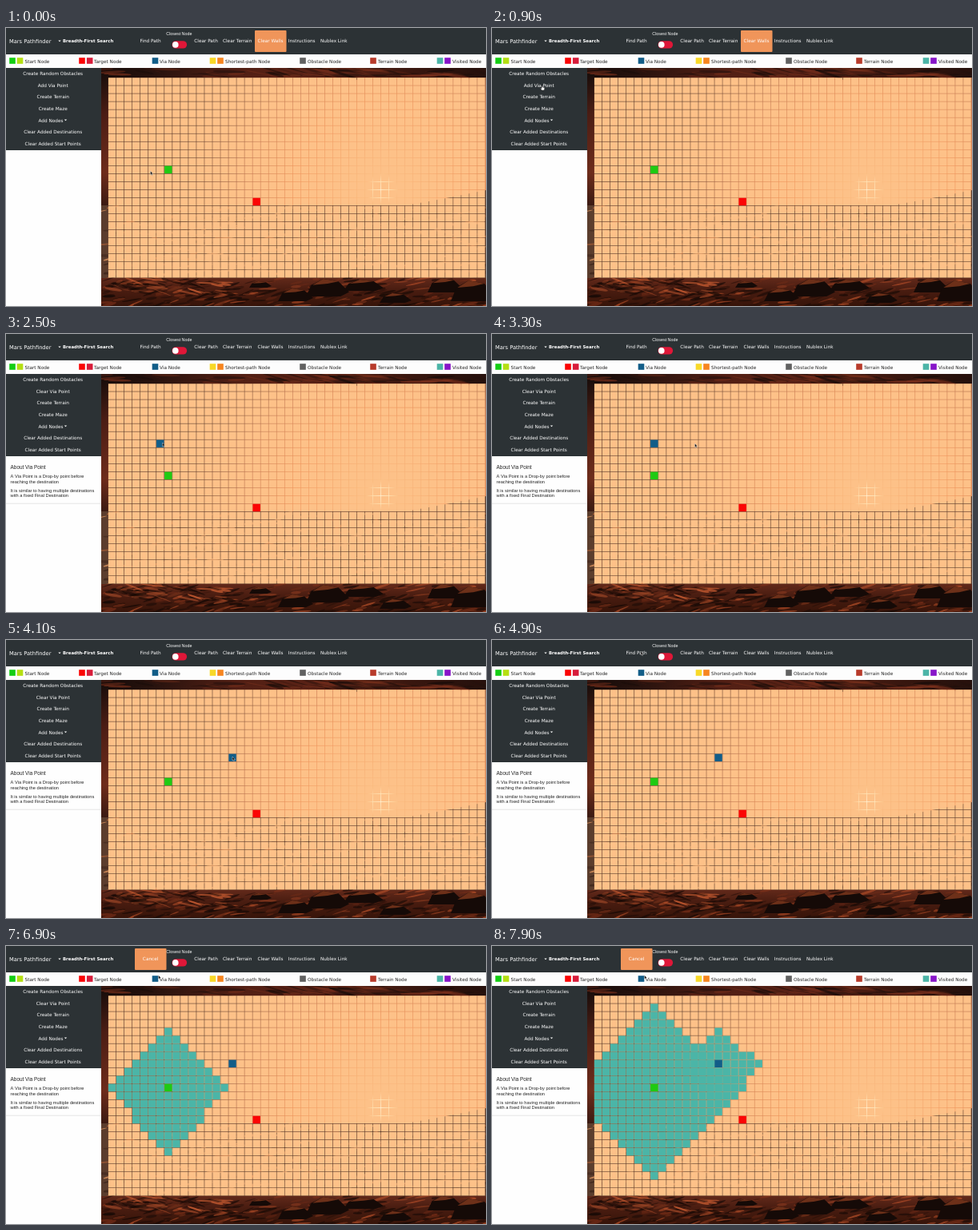
An HTML page with a canvas that plays this animation: 600x348 px, repeating every 8000 ms.

```html
<!DOCTYPE html>
<html lang="en">
<head>
<meta charset="utf-8">
<title>Mars Pathfinder</title>
<style>
html, body { margin: 0; width: 100%; height: 100%; overflow: hidden; background: #fff; }
canvas { display: block; width: 600px; height: 348px; }
</style>
</head>
<body>
<canvas id="stage"></canvas>
<script>
const W = 600, H = 348, LOOP = 8000;
const SANS = '"DejaVu Sans", sans-serif', ARIAL = '"Liberation Sans", sans-serif';
const GRID = { x: 127.6, y: 62, cols: 47, rows: 25, step: 10.03, gap: 0.6 };
const COLOR = {
  bar: '#2c3235', hot: '#f0955a', sand: '#fdc188', teal: '#4bb5a7',
  green: '#1fca12', red: '#fb0505', blue: '#125d88'
};
const START = [7, 11], TARGET = [18, 15], VIA = [15, 8];
const CLICK_VIA = 1000, SEARCH_AT = 6156, CELLS_PER_MS = 0.164;

const scale = window.devicePixelRatio || 1;

function layer(canvas) {
  canvas.width = W * scale;
  canvas.height = H * scale;
  const c = canvas.getContext('2d');
  c.scale(scale, scale);
  return c;
}

const ctx = layer(document.getElementById('stage'));
const backdrop = document.createElement('canvas');
const pageArt = document.createElement('canvas');

function rect(c, x, y, w, h, fill) {
  c.fillStyle = fill;
  c.fillRect(x, y, w, h);
}

function round(c, x, y, w, h, r, fill) {
  c.beginPath();
  c.roundRect(x, y, w, h, r);
  c.fillStyle = fill;
  c.fill();
}

function text(c, str, x, y, size, fill, opt = {}) {
  c.font = `${opt.bold ? 'bold ' : ''}${size}px ${opt.font || SANS}`;
  c.textAlign = opt.align || 'left';
  c.fillStyle = fill;
  c.fillText(str, x, y);
}

function poly(c, points, fill) {
  c.beginPath();
  points.forEach(([x, y]) => c.lineTo(x, y));
  c.closePath();
  c.fillStyle = fill;
  c.fill();
}

function gradient(g, stops) {
  stops.forEach(([at, color]) => g.addColorStop(at, color));
  return g;
}

function randomFrom(seed) {
  return () => (seed = (seed * 16807) % 2147483647) / 2147483647;
}

function caret(c, x, y) {
  poly(c, [[x, y], [x + 3.4, y], [x + 1.7, y + 1.8]], '#fff');
}

// Scatters thin slanted ellipses over a box.
function streaks(c, rnd, n, [x, y, w, h], len, tilt, colors) {
  for (let i = 0; i < n; i++) {
    c.globalAlpha = 0.25 + rnd() * 0.5;
    c.beginPath();
    c.ellipse(x + rnd() * w, y + rnd() * h, len * (0.3 + rnd() * 0.7), 0.6 + rnd() * 1.3,
      tilt + (rnd() - 0.5) * 0.4, 0, 7);
    c.fillStyle = colors[Math.floor(rnd() * colors.length)];
    c.fill();
  }
  c.globalAlpha = 1;
}

// Soft desert scene: it shows around the board and through the gaps between cells.
function paintBackdrop(c) {
  const rnd = randomFrom(77);
  c.save();
  c.beginPath();
  c.rect(119, 50, 481, 298);
  c.clip();
  rect(c, 119, 50, 481, 298, '#54382b');
  rect(c, 119, 62, 481, 160, gradient(c.createRadialGradient(470, 202, 0, 470, 202, 290),
    [[0, '#fffbe2'], [0.035, '#ffe9bd'], [0.07, '#fabb80'], [0.38, '#ee945c'],
     [0.58, '#c47a53'], [0.8, 'rgba(112,74,54,.8)'], [1, 'rgba(84,56,43,0)']]));
  rect(c, 119, 50, 481, 12, gradient(c.createLinearGradient(119, 0, 600, 0),
    [[0, '#140b09'], [0.15, '#2a130e'], [0.35, '#521f14'], [0.6, '#5b2316'], [0.8, '#3a170f'], [1, '#23100c']]));
  streaks(c, rnd, 60, [119, 50, 481, 11], 26, 0.12, ['#160b08', '#7a301c', '#2a120d']);
  rect(c, 119, 58, 9, 164, gradient(c.createLinearGradient(0, 58, 0, 222),
    [[0, '#1a0e0b'], [0.3, '#4a1d14'], [0.75, '#6e2c1b'], [1, '#3a1a12']]));

  poly(c, [[119, 222], [500, 222], [545, 214], [600, 203], [600, 348], [119, 348]], '#5b3d2d');
  streaks(c, rnd, 420, [119, 224, 481, 88], 10, -0.1, ['#2a1710', '#e59a62', '#c06a3a']);
  rect(c, 119, 313, 481, 35, gradient(c.createLinearGradient(0, 313, 0, 348),
    [[0, '#62291a'], [0.4, '#4a1d11'], [1, '#371409']]));
  streaks(c, rnd, 230, [119, 313, 481, 35], 13, -0.2, ['#120805', '#1d0c07', '#b24d28', '#7c3019']);
  streaks(c, rnd, 45, [119, 313, 160, 20], 15, 0.2, ['#c85c32', '#160905']);
  const rocks = [[362, 334, 22, 8], [402, 325, 27, 11], [447, 322, 25, 7],
                 [487, 338, 20, 6], [549, 322, 22, 9], [584, 329, 28, 13], [318, 321, 14, 4]];
  rocks.forEach(([x, y, rx, ry]) => {
    poly(c, [[x - rx, y + ry], [x - rx * 0.75, y - ry * 0.3], [x - rx * 0.2, y - ry],
             [x + rx * 0.5, y - ry * 0.7], [x + rx, y + ry * 0.5], [x + rx * 0.6, y + ry]], '#150a07');
    poly(c, [[x - rx * 0.7, y - ry * 0.3], [x - rx * 0.2, y - ry], [x + rx * 0.5, y - ry * 0.7],
             [x, y - ry * 0.45]], '#6d3019');
  });
  c.restore();
}

function paintLegend(c) {
  rect(c, 0, 33, W, 17, '#fdfdfd');
  const items = [
    ['Start Node', 23.5, [4.2, '#13ce13'], [13.7, '#b5df12']],
    ['Target Node', 110, [91.2, '#fb0505'], [100.9, '#d81c3a']],
    ['Via Node', 192, [182.7, COLOR.blue]],
    ['Shortest-path Node', 274, [254.7, '#f8d927'], [264.2, '#f7851f']],
    ['Obstacle Node', 377, [367.2, '#606060']],
    ['Terrain Node', 465, [455.2, '#b83a2a']],
    ['Visited Node', 558, [538.7, COLOR.teal], [548.2, '#8715c9']]
  ];
  items.forEach(([label, x, ...swatches]) => {
    swatches.forEach(([sx, color]) => rect(c, sx, 37.2, 7.6, 7.6, color));
    text(c, label, x, 43.5, 5.75, '#252525');
  });
}

function paintPage(c) {
  rect(c, 0, 0, W, 33, COLOR.bar);
  text(c, 'Mars Pathfinder', 4, 18.8, 6.7, '#fff');
  caret(c, 65.3, 15.4);
  text(c, 'Breadth-First Search', 71, 18.4, 5.4, '#fff', { bold: true });
  text(c, 'Closest Node', 200.3, 9, 5.35, '#fff', { font: ARIAL });
  round(c, 207.5, 16.2, 18.6, 9.4, 4.7, '#df1738');
  c.beginPath();
  c.arc(211.8, 20.9, 3.8, 0, 7);
  c.fillStyle = '#fff';
  c.fill();
  paintLegend(c);
  rect(c, 0, 50, 119, 298, '#fefefe');
  rect(c, 0, 50, 119, 103, COLOR.bar);
  caret(c, 72.8, 114.4);
}

// Breadth-first order: down, right, up, left; stops on reaching the goal.
function search(from, goal, limit) {
  const seen = new Set([from.join()]), queue = [from], order = [];
  while (queue.length && order.length < limit) {
    const [x, y] = queue.shift();
    order.push([x, y]);
    if (x === goal[0] && y === goal[1]) break;
    for (const [dx, dy] of [[0, 1], [1, 0], [0, -1], [-1, 0]]) {
      const nx = x + dx, ny = y + dy, key = nx + ',' + ny;
      if (nx < 0 || ny < 0 || nx >= GRID.cols || ny >= GRID.rows || seen.has(key)) continue;
      seen.add(key);
      queue.push([nx, ny]);
    }
  }
  return order;
}

const visited = [...search(START, VIA, 999), ...search(VIA, TARGET, 120)];

function cell([col, row], color) {
  const { x, y, step, gap } = GRID;
  rect(ctx, x + col * step + gap / 2, y + row * step + gap / 2, step - gap, step - gap, color);
}

function viaAt(t) {
  if (t < 2600) return [6, 7];
  if (t < 3400) return [7, 7];
  const p = Math.min(1, (t - 3400) / 600);
  return [7 + Math.round(p * 8), p > 0.8 ? 8 : 7];
}

function drawBoard(t) {
  for (let row = 0; row < GRID.rows; row++)
    for (let col = 0; col < GRID.cols; col++) cell([col, row], COLOR.sand);
  const count = Math.max(0, Math.round((t - SEARCH_AT) * CELLS_PER_MS));
  visited.slice(0, count).forEach(pos => cell(pos, COLOR.teal));
  cell(START, COLOR.green);
  cell(TARGET, COLOR.red);
  if (t >= CLICK_VIA) cell(viaAt(t), COLOR.blue);
}

function drawNav(t) {
  if (t < CLICK_VIA) round(ctx, 311, 3, 39.5, 27, 1, COLOR.hot);
  const glow = Math.max(0, Math.min(1, (t - 4950) / 150));
  ctx.globalAlpha = glow;
  round(ctx, 161, 3, 39.5, 27, 1, COLOR.hot);
  ctx.globalAlpha = 1;
  const label = t < SEARCH_AT ? 'Find Path' : 'Cancel';
  text(ctx, label, 180.6, 18.4, 5.75, '#fff', { align: 'center' });
  [['Clear Path', 235.3], ['Clear Terrain', 271], ['Clear Walls', 314.6],
   ['Instructions', 352.8], ['Nublex Link', 393]]
    .forEach(([str, x]) => text(ctx, str, x, 18.4, 5.75, '#fff'));
}

function drawSidebar(t) {
  const added = t >= CLICK_VIA;
  if (added && t < 2500) {
    rect(ctx, 0, 64.3, 119, 15.2, '#191b1c');
    ctx.strokeStyle = '#d98a55';
    ctx.lineWidth = 0.8;
    ctx.strokeRect(0.4, 64.7, 118.2, 14.6);
  }
  ['Create Random Obstacles', added ? 'Clear Via Point' : 'Add Via Point', 'Create Terrain',
   'Create Maze', 'Add Nodes', 'Clear Added Destinations', 'Clear Added Start Points']
    .forEach((str, i) => text(ctx, str, i === 4 ? 56 : 58.7, 59 + i * 14.65, 5.75, '#fff', { align: 'center' }));
  if (!added) return;
  const say = (str, y, size) => text(ctx, str, 5.6, y, size, '#222', { font: ARIAL });
  say('About Via Point', 168.8, 6.4);
  say('A Via Point is a Drop-by point before', 180.3, 5.7);
  say('reaching the destination', 187.1, 5.7);
  say('It is similar to having multiple destinations', 197.6, 5.7);
  say('with a fixed Final Destination', 204.4, 5.7);
  rect(ctx, 0, 211.8, 119, 0.7, '#dcdcdc');
}

// Pointer stops: time, x, y.
const route = [[0, 180.5, 179], [400, 180.5, 179], [900, 62, 72], [1150, 62, 72], [1800, 191, 56],
  [2400, 193, 136], [2600, 198, 136], [2900, 206, 137], [3300, 253.5, 137], [3700, 283, 146],
  [4200, 283, 146], [4900, 186, 14], [6200, 185, 14], [6500, 190.5, 36.5], [8000, 190.5, 36.5]];

function pointerAt(t) {
  const i = Math.max(1, route.findIndex(stop => stop[0] > t));
  const [t0, x0, y0] = route[i - 1], [t1, x1, y1] = route[i];
  const p = (t - t0) / (t1 - t0), e = p * p * (3 - 2 * p);
  return [x0 + (x1 - x0) * e, y0 + (y1 - y0) * e];
}

function drawPointer(t) {
  const [x, y] = pointerAt(t);
  const hand = (t > 4950 && t < 6300) || (t > 880 && t < 1200);
  const shape = hand
    ? [[0, 0], [1, 0], [1.2, 2], [3.8, 2.6], [3.6, 5], [2.8, 6], [0.2, 6], [-1.5, 3.5], [-0.9, 3], [0, 3.8]]
    : [[0, 0], [0, 4.8], [1, 3.9], [1.8, 5.6], [2.6, 5.2], [1.8, 3.6], [3.3, 3.5]];
  poly(ctx, shape.map(([px, py]) => [x + px, y + py]), hand ? '#fff' : '#111');
  ctx.strokeStyle = hand ? '#222' : 'rgba(255,255,255,.75)';
  ctx.lineWidth = 0.5;
  ctx.stroke();
}

function frame() {
  const t = performance.now() % LOOP;
  ctx.drawImage(backdrop, 0, 0, W, H);
  drawBoard(t);
  ctx.drawImage(pageArt, 0, 0, W, H);
  drawNav(t);
  drawSidebar(t);
  drawPointer(t);
  requestAnimationFrame(frame);
}

paintBackdrop(layer(backdrop));
paintPage(layer(pageArt));
frame();
</script>
</body>
</html>
```
